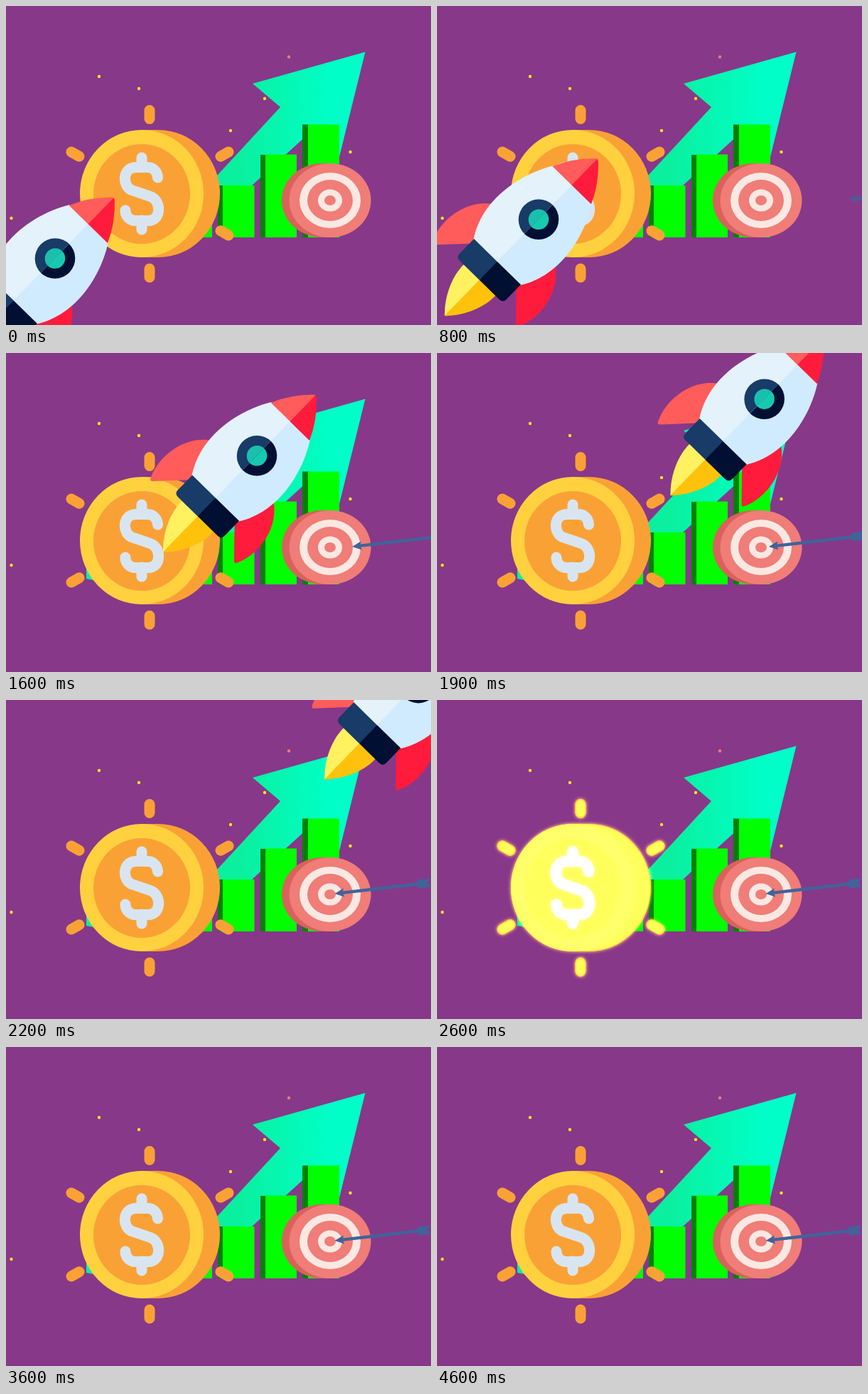
An HTML page that plays this animation: 598x448 px, repeating every 5 s.

```html
<!DOCTYPE html>
<html lang="en">
<head>
<meta charset="utf-8">
<title>Business growth</title>
<style>
  html, body { margin: 0; width: 100%; height: 100%; overflow: hidden; background: #873889; }
  svg { display: block; width: 598px; height: 448px; }

  .ray { stroke: #faa136; stroke-width: 15; stroke-linecap: round; }
  .dollar { fill: none; stroke: #d8e5f0; stroke-width: 15; stroke-linecap: round; }
  .glow { opacity: 0; }
  #halo { filter: drop-shadow(0 0 2px #f5a524); }
  #shine { filter: blur(2.5px) brightness(1.4); mix-blend-mode: plus-lighter; }

  .light { --fin: #ff5c5b; --hull: #e3f2fb; --navy: #183b68; --glass: #1ac0ac; --fire: #fff160; }
  .dark { --fin: #ff1b3c; --hull: #d0ebfd; --navy: #000f32; --glass: #16cab0; --fire: #ffc20c; }
  .fin { fill: var(--fin); }
  .hull { fill: var(--hull); }
  .navy { fill: var(--navy); }
  .glass { fill: var(--glass); }
  .fire { fill: var(--fire); }
</style>
</head>
<body>
<svg viewBox="0 0 598 448">
  <defs>
    <linearGradient id="mint" gradientUnits="userSpaceOnUse" x1="330" y1="0" x2="460" y2="0">
      <stop offset="0" stop-color="#0af09f"/>
      <stop offset="1" stop-color="#00ffc8"/>
    </linearGradient>

    <g id="coin">
      <path class="ray" d="M202 146.5v12M202 369v12M92 205l11 6.3M302 211.3l11-6.3M92 322l11-6.3M302 315.7l11 6.3"/>
      <path fill="#faa136" d="M191 174H214A87 89.5 0 0 1 214 353H191z"/>
      <ellipse cx="191" cy="263.5" rx="87" ry="89.5" fill="#ffd13f"/>
      <ellipse cx="191" cy="264" rx="68" ry="70" fill="#faa136"/>
      <path class="dollar" d="M191 213v13M191 301v13M213.500 241A14 15 0 0 0 199 226.500H183C163 226.500 163 254 178 259L203 267.500C219 273 219 301.500 200 301.500H182A14 14 0 0 1 168 287"/>
    </g>

    <!-- One side of the rocket, pointing along +x, centred on the window -->
    <g id="side">
      <path class="fin" d="M-30 58V62C-52 93-98 99-127 85Q-131 83-128 80L-88 42z"/>
      <path class="fire" d="M-116-.3V31C-140 33-168 20-186 3Q-189 1-189-.3z"/>
      <path class="hull" d="M68-.3V38C30 62-35 78-84 46V-.3z"/>
      <path class="fin" d="M67-.3V38Q95 26 117 3Q118.500 1.500 118.500-.3z"/>
      <path class="navy" d="M-83-.3V46H-112Q-119 46-119 39V-.3z"/>
      <path class="navy" d="M28.500-.3A28.500 28.500 0 0 1-28.500-.3z"/>
      <path class="glass" d="M14.500-.3A14.500 14.500 0 0 1-14.500-.3z"/>
    </g>
  </defs>

  <rect width="598" height="448" fill="#873889"/>
  <path fill="none" stroke="#ffe11a" stroke-width="4.400" stroke-linecap="round"
        d="M131 99h0M187 116h0M364 130h0M316 175h0M484.500 205h0M7.500 298h0"/>
  <circle cx="398" cy="71.500" r="2.200" fill="#f07d6e"/>

  <path fill="url(#mint)" d="M505.500 64.500L347 109L386 142L298 237Q220 306 113 304V317Q240 345 346 252L425 180L462 240z"/>

  <path fill="#008000" d="M298 252h8v73h-8zM358 209h8v116h-8zM417 166.500h9v158.500h-9z"/>
  <path fill="#0f0" d="M246 295h44v30h-44zM305 252h44.500v73h-44.500zM365 208.500h44v116.500h-44zM425 166.500h44v158.500h-44z"/>

  <g fill="#f07d77">
    <path fill="#d9625c" d="M456 221H445A57 52 0 0 0 445 325H456z"/>
    <ellipse cx="456" cy="273" rx="57.500" ry="52"/>
    <ellipse cx="456" cy="273" rx="43" ry="39" fill="#fce8e3"/>
    <ellipse cx="456" cy="273" rx="32" ry="29"/>
    <ellipse cx="456" cy="273" rx="17" ry="15.500" fill="#fce8e3"/>
    <ellipse cx="456" cy="273" rx="8" ry="7"/>
  </g>

  <g id="dart">
    <path transform="rotate(-6.600)" fill="#41639a"
          d="M0 0L13-6L12-2.200H115L120-6H136L131 0L136 6H120L115 2.200H12L13 6z"/>
  </g>

  <use id="halo" class="glow" href="#coin"/>
  <use href="#coin"/>
  <use id="shine" class="glow" href="#coin"/>

  <g id="rocket">
    <g transform="rotate(-45.700)">
      <use href="#side" class="light" transform="scale(1 -1)"/>
      <use href="#side" class="dark"/>
    </g>
  </g>
</svg>

<script>
  const LOOP = 5000, STEP = 100;
  const rocket = document.getElementById('rocket');
  const dart = document.getElementById('dart');
  const glows = document.querySelectorAll('.glow');
  const clamp = x => Math.min(1, Math.max(0, x));
  const move = (el, x, y) => el.setAttribute('transform', `translate(${x} ${y})`);

  function draw(now) {
    const t = Math.floor(now % LOOP / STEP) * STEP;

    // slow lift-off, leaving through the top right corner
    const run = 925 * (1 - Math.cos(Math.min(t, 3000) / 1987));
    move(rocket, 69 + run, 354.5 - run * 0.74);

    // the dart slows down into the bullseye
    const left = Math.max(0, (2040 - t) / 1240);
    move(dart, 462.5 + 116.5 * left ** 1.5, 272);
    dart.setAttribute('opacity', clamp((t - 500) / 400));

    const glow = Math.sin(Math.PI * clamp((t - 2400) / 1200));
    glows.forEach(el => el.style.opacity = glow);

    requestAnimationFrame(() => draw(performance.now() - start));
  }

  const start = performance.now();
  draw(0);
</script>
</body>
</html>
```
